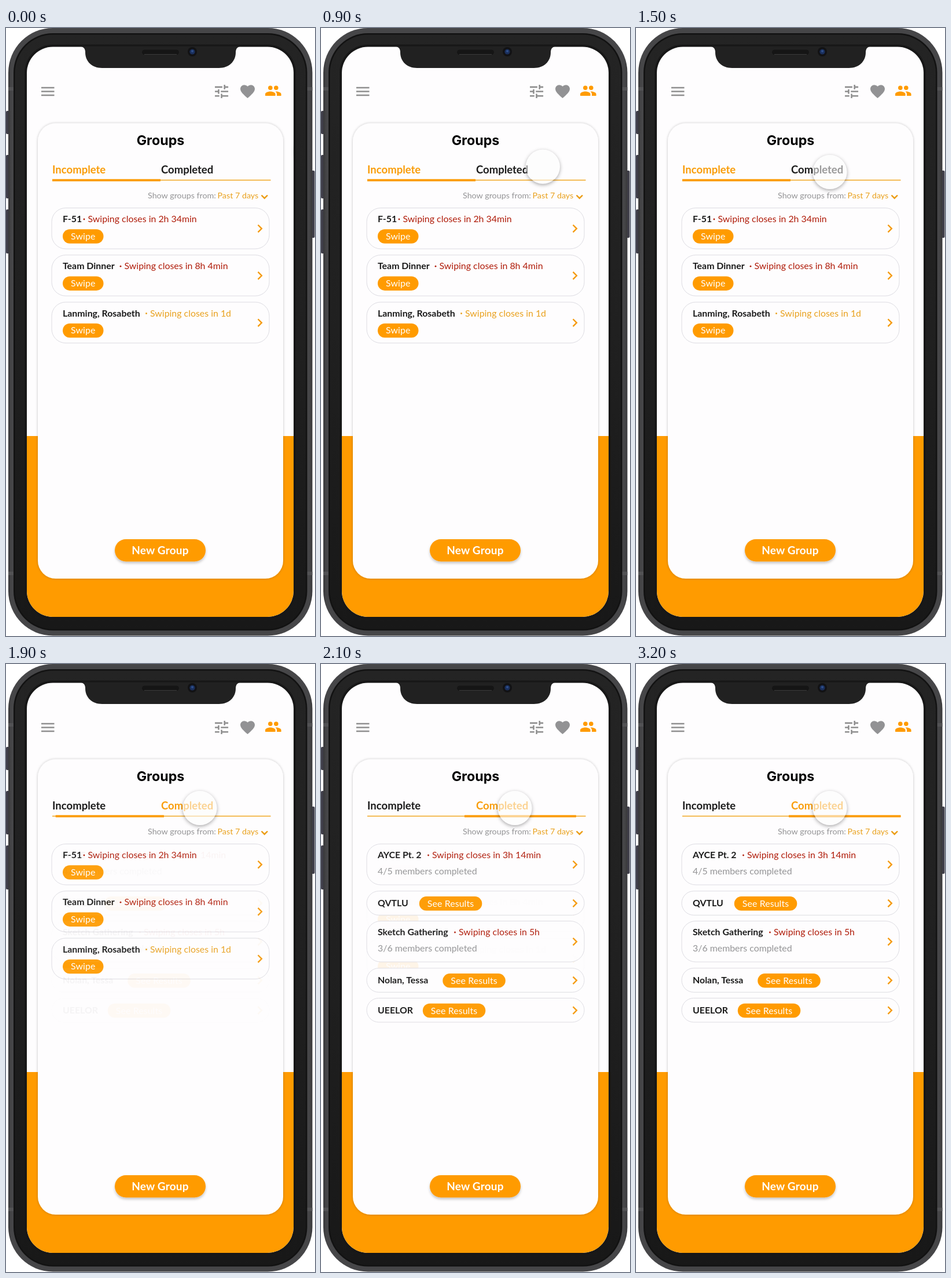
These frames come from a looping animation (534 px wide and 1049 px high, 3.3 s). An HTML page:

```html
<!DOCTYPE html>
<html lang="en">
<head>
<meta charset="utf-8">
<title>Groups</title>
<style>
  html, body { margin: 0; width: 100%; height: 100%; overflow: hidden; background: #fff; }
  svg { position: absolute; left: 0; top: 0; width: 534px; height: 1049px; }
  text { font: 400 15.9px Lato, sans-serif; }
  .title { font: 700 23.2px Inter, sans-serif; text-anchor: middle; }
  .tab { font-size: 18.5px; font-weight: 700; fill: #1c1c1c; }
  .tab.on { fill: #f99d0a; }
  .small { font-size: 14.3px; }
  .name { font-weight: 700; fill: #1a1a1a; }
  .red { fill: #b01c0a; }
  .amber { fill: #e9a11d; }
  .grey { fill: #949496; }
  .pill { fill: #fff; text-anchor: middle; letter-spacing: .1px; }
  .big { font-size: 19px; font-weight: 700; letter-spacing: .2px; }
  .box { fill: #fefdfe; stroke: #dddce2; }
  .line { fill: none; stroke-width: 2.4; }
  .screen { position: absolute; left: 36px; top: 32.5px; width: 461px; height: 983.5px;
    border-radius: 45px; overflow: hidden; }
  #cursor { position: absolute; left: -65.5px; top: -62px; width: 59px; height: 59px;
    border-radius: 50%; background: rgba(253, 253, 253, .56);
    box-shadow: 0 2px 6px rgba(0, 0, 0, .34); }
</style>
</head>
<body>
<svg viewBox="0 0 534 1049">
  <defs>
    <linearGradient id="rim">
      <stop offset="0" stop-color="#38383a"/><stop offset=".01" stop-color="#464648"/>
      <stop offset=".99" stop-color="#464648"/><stop offset="1" stop-color="#38383a"/>
    </linearGradient>
    <linearGradient id="bezel" x2="0" y2="1">
      <stop offset="0" stop-color="#242424"/><stop offset=".5" stop-color="#202020"/>
      <stop offset="1" stop-color="#181818"/>
    </linearGradient>
    <filter id="soft" x="-10%" y="-10%" width="120%" height="120%">
      <feDropShadow dx="0" dy="0" stdDeviation="2.2" flood-opacity=".24"/>
    </filter>
    <filter id="lift" x="-10%" y="-20%" width="120%" height="160%">
      <feDropShadow dx="0" dy="3" stdDeviation="2" flood-opacity=".22"/>
    </filter>
    <clipPath id="glass"><rect x="36" y="32.5" width="461" height="983.5" rx="45"/></clipPath>
  </defs>

  <!-- phone -->
  <g fill="#3f3e49">
    <rect y="143" width="8" height="40" rx="2"/>
    <rect y="219" width="8" height="75" rx="2"/>
    <rect y="313" width="8" height="76" rx="2"/>
    <rect x="525" y="246" width="8.5" height="116" rx="2"/>
  </g>
  <rect x="4" y="0" width="525.5" height="1048.5" rx="77" fill="url(#rim)"/>
  <path d="M4 105H13M520 105H529.5M4 941H13M520 941H529.5" stroke="#525254" stroke-width="6"/>
  <rect x="13" y="9" width="507.5" height="1030.5" rx="68" fill="#121212"/>
  <rect x="15.5" y="11.5" width="502.5" height="1025.5" rx="66" fill="url(#bezel)"/>
  <rect x="32" y="28.5" width="469" height="991.5" rx="49" fill="#171717"/>

  <!-- screen -->
  <g clip-path="url(#glass)">
    <rect x="36" y="32" width="461" height="984" fill="#fefdfe"/>
    <rect x="36" y="704" width="461" height="312" fill="#ff9b00"/>
  </g>
  <path d="M126 31.5Q137 31.500 137 42C137 58 149 69 166 69H368C385 69 397 58 397 42Q397 31.500 408 31.500Z" fill="#212121"/>
  <rect x="235" y="37.5" width="64" height="8.5" rx="4.2" fill="#151515"/>
  <path d="M239 45.5H295" stroke="#3a3a3a"/>
  <circle cx="322" cy="41" r="8" fill="#121214"/>
  <circle cx="322" cy="41" r="4.6" fill="#1a2f5c"/>
  <circle cx="322" cy="40" r="2" fill="#2e4f8c"/>

  <!-- toolbar -->
  <path class="line" d="M61 103H83.5M61 109.5H83.5M61 116H83.5" stroke="#8f8f8f"/>
  <path transform="translate(357.2 94.2) scale(1.28)" fill="none" stroke="#8f8f8f" stroke-width="2"
    d="M3 18h6M12 18h9M12 15v6M3 12h5M8 9v6M11 12h10M3 6h10M16 3v6M16 6h5"/>
  <path transform="translate(402.5 94.4) scale(1.25)" fill="#929294"
    d="M12 21.35C6 16 2 12.5 2 8.5C2 5.4 4.4 3 7.5 3Q10.3 3 12 5.1Q13.7 3 16.5 3C19.6 3 22 5.4 22 8.5C22 12.5 18 16 12 21.35Z"/>
  <g transform="translate(446.8 93.2) scale(1.25)" fill="#ff9b00">
    <circle cx="8" cy="8" r="3"/><circle cx="16" cy="8" r="3"/>
    <path d="M1 19V16.5C1 14.2 5.7 13 8 13S15 14.2 15 16.5V19ZM17 19V16.5Q17 14.5 15 13.05C17.5 12.7 23 14 23 16.5V19Z"/>
  </g>

  <!-- panel -->
  <rect x="55" y="164.5" width="424" height="785.5" rx="31" fill="#fefdfe" filter="url(#soft)"/>
  <text class="title" x="267" y="201.5">Groups</text>
  <text class="tab" id="tabA" x="80" y="251">Incomplete</text>
  <text class="tab" id="tabB" x="268" y="251">Completed</text>
  <rect x="80" y="261.7" width="377.5" height="1.6" fill="#f0aa2a"/>
  <rect id="marker" y="260.7" height="3.8" fill="#fb9b04"/>
  <text class="small grey" x="245" y="294">Show groups from:</text>
  <text class="small amber" x="365.5" y="294">Past 7 days</text>
  <path class="line" d="M441.5 288.5L446.7 293.7L452 288.5" stroke="#eb9c12"/>
  <g id="listA"></g>
  <g id="listB"></g>
  <rect x="188" y="882" width="157" height="38.5" rx="19.2" fill="#ff9b00" filter="url(#lift)"/>
  <text class="pill big" x="266.5" y="908">New Group</text>
</svg>
<div class="screen"><div id="cursor"></div></div>

<script>
const $ = id => document.getElementById(id);
const ORANGE = '#ff9b00';

const label = (x, y, cls, str) => `<text class="${cls}" x="${x}" y="${y}">${str}</text>`;

const pill = (x, y, w, str) =>
  `<rect x="${x}" y="${y}" width="${w}" height="24.5" rx="12.2" fill="${ORANGE}"/>` +
  label(x + w / 2, y + 17.7, 'pill', str);

const status = (x, y, cls, str) =>
  `<circle class="${cls}" cx="${x - 6.5}" cy="${y - 5}" r="1.4"/>` +
  label(x, y, cls, 'Swiping closes in ' + str);

function card(y, h, name, body) {
  const mid = y + h / 2;
  return `<rect class="box" x="79" y="${y}" width="376" height="${h}" rx="${Math.min(24, h / 2)}"/>
    <path class="line" d="M435.5 ${mid - 6}l6.3 6.3l-6.3 6.3" stroke="#f59a0c"/>` +
    label(98, h > 50 ? y + 24.5 : mid + 5.7, 'name', name) + body;
}

const openCard = (y, name, x, cls, left) =>
  card(y, 70.5, name, status(x, y + 24.5, cls, left) + pill(98, y + 36.7, 70.5, 'Swipe'));

const waitingCard = (y, name, x, left, done) =>
  card(y, 70.5, name, status(x, y + 24.5, 'red', left) +
    label(98, y + 52.7, 'grey', done + ' members completed'));

const doneCard = (y, name, x) =>
  card(y, 41.5, name, pill(x, y + 9.3, 108.5, 'See Results'));

$('listA').innerHTML =
  openCard(310.5, 'F-51', 141.5, 'red', '2h 34min') +
  openCard(391.7, 'Team Dinner', 204.5, 'red', '8h 4min') +
  openCard(473, 'Lanming, Rosabeth', 249, 'amber', '1d');

$('listB').innerHTML =
  waitingCard(310.5, 'AYCE Pt. 2', 192, '3h 14min', '4/5') +
  doneCard(391.8, 'QVTLU', 169.8) +
  waitingCard(443.5, 'Sketch Gathering', 238, '5h', '3/6') +
  doneCard(524.8, 'Nolan, Tessa', 210.3) +
  doneCard(576.5, 'UEELOR', 175.8);

const LOOP = 3300, STEP = 100, LEAD = 25;
const mix = (a, b, p) => a + (b - a) * p;
const span = (t, start, length) => Math.min(1, Math.max(0, (t - start) / length));

// cubic-bezier(0, 0, .58, 1), solved for x by bisection
function easeOut(x) {
  let lo = 0, hi = 1;
  for (let i = 0; i < 24; i++) {
    const s = (lo + hi) / 2;
    if (1.74 * s * s - .74 * s ** 3 < x) lo = s; else hi = s;
  }
  return 3 * lo * lo - 2 * lo ** 3;
}

function draw(t) {
  const glide = 1 - (1 - span(t, 600, 600)) ** 2;
  $('cursor').style.transform =
    `translate(${mix(528, 334.5, glide)}px, ${mix(211, 248, glide)}px)`;

  const swapped = t >= 1900;
  $('tabA').classList.toggle('on', !swapped);
  $('tabB').classList.toggle('on', swapped);

  const slide = easeOut(span(t, 1895, 270));
  $('marker').setAttribute('x', mix(80, 264, slide));
  $('marker').setAttribute('width', mix(187, 193.5, slide));
  $('listA').style.opacity = 1 - slide;
  $('listB').style.opacity = easeOut(span(t, 1895, 240));
}

// The picture advances ten times a second; the lead absorbs display latency.
function tick() {
  draw(Math.floor((performance.now() + LEAD) / STEP) * STEP % LOOP);
  requestAnimationFrame(tick);
}
tick();
</script>
</body>
</html>
```
